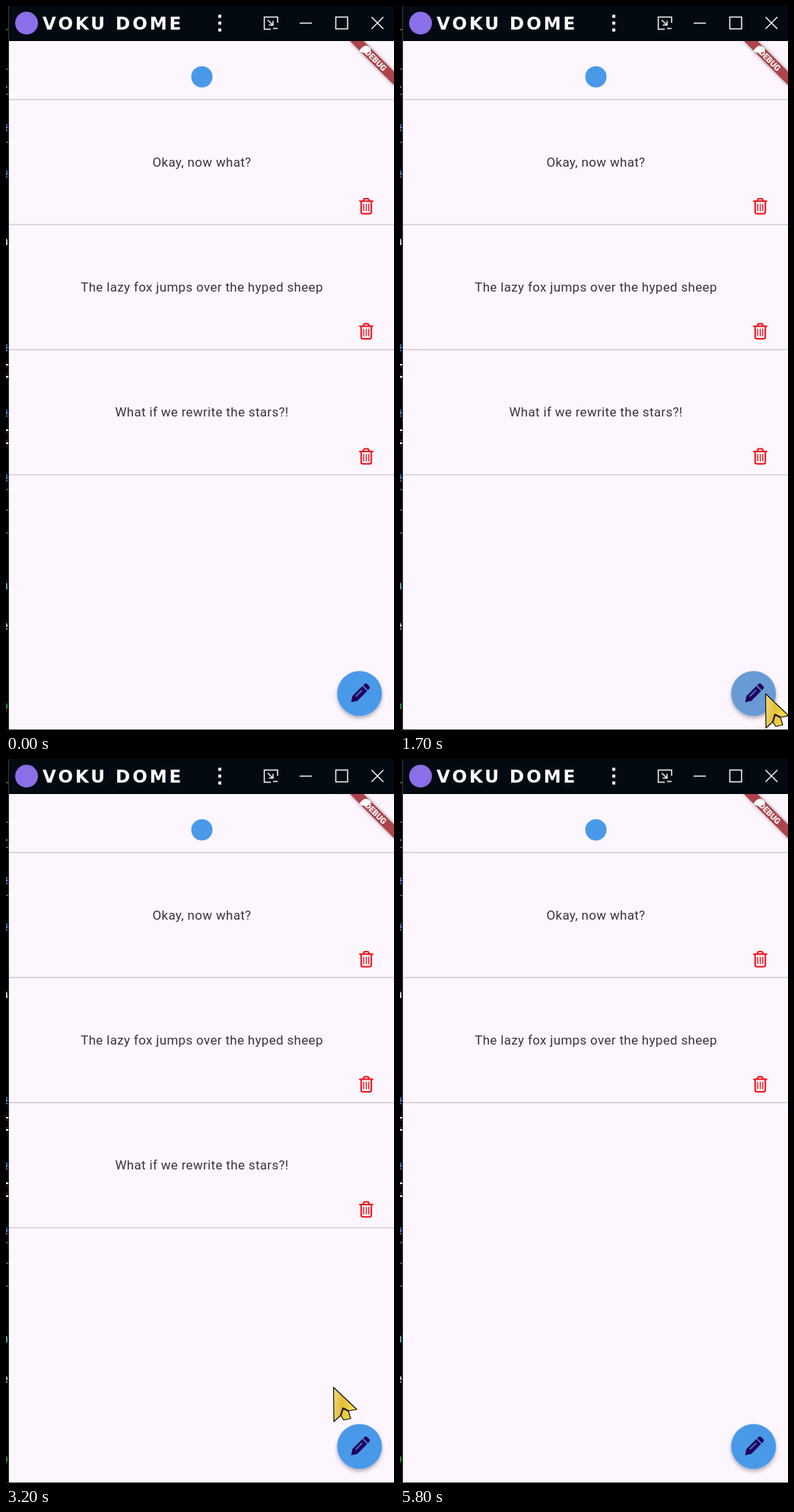
Animation, 510 px wide and 952 px high, one loop 5.9 s. Source, as an HTML page:

```html
<!DOCTYPE html>
<html lang="en">
<head>
<meta charset="utf-8">
<title>Notes app</title>
<style>
  html, body { margin: 0; width: 100%; height: 100%; overflow: hidden; background: #000; }
  svg { display: block; width: 510px; height: 952px; font-family: Roboto, sans-serif; }
  .item { font-size: 16.9px; letter-spacing: .37px; fill: #38333d; text-anchor: middle; }
  .button { font-size: 23.2px; letter-spacing: .1px; fill: #17161b; text-anchor: middle; }
  .hint { font-size: 19px; letter-spacing: .43px; fill: #727983; }
  .brand { font: bold 23px "DejaVu Sans", sans-serif; letter-spacing: 3px; fill: #fff; }
  .code { font: 16px "DejaVu Sans Mono", monospace; }
  .rule { stroke: #d3cad7; stroke-width: 1.5; }
</style>
</head>
<body>
<svg viewBox="0 0 510 952">
  <defs>
    <clipPath id="screen"><rect x="4" y="46" width="506" height="904"/></clipPath>
    <clipPath id="strip"><rect width="3" height="952"/></clipPath>
    <filter id="fabShadow" x="-30%" y="-30%" width="160%" height="170%">
      <feDropShadow dx="0" dy="3" stdDeviation="2.5" flood-opacity=".3"/>
    </filter>
    <filter id="buttonShadow" x="-2%" y="-10%" width="104%" height="130%">
      <feDropShadow dx="0" dy="1" stdDeviation=".7" flood-opacity=".25"/>
    </filter>
    <filter id="bannerShadow" x="-20%" y="-20%" width="140%" height="140%">
      <feDropShadow dx="0" dy="0" stdDeviation="2.5" flood-opacity=".4"/>
    </filter>
    <linearGradient id="gold" x2="1" y2=".25">
      <stop offset="0" stop-color="#f3df83"/>
      <stop offset=".45" stop-color="#e3bd3f"/>
      <stop offset="1" stop-color="#fbe04e"/>
    </linearGradient>
    <g id="header">
      <rect x="4" y="46" width="506" height="904" fill="#fef6ff"/>
      <circle cx="257.5" cy="93" r="14" fill="#4a99e9"/>
      <path class="rule" d="M4 122.7H510"/>
    </g>
    <g id="trash" fill="none" stroke="#f0141c" stroke-width="2" stroke-linecap="round" stroke-linejoin="round">
      <path d="M465 256.3H482M469.3 256L471 253H476L477.7 256M466.8 257V270.2Q466.8 272.7 469.3 272.7H477.7Q480.2 272.7 480.2 270.2V257"/>
      <path stroke-width="1.4" d="M470.2 260.2V268.8M473.5 260.2V268.8M476.8 260.2V268.8"/>
    </g>
  </defs>

  <rect width="510" height="952"/>
  <g id="editor" class="code" clip-path="url(#strip)"></g>
  <path d="M3.5 0V952" stroke="#4a4a50" stroke-width=".8"/>

  <g clip-path="url(#screen)">
    <rect x="4" y="46" width="506" height="904" fill="#fef6ff"/>
    <g id="listPage">
      <use href="#header"/>
      <g id="items"></g>
      <circle id="fab" cx="464.7" cy="902.7" r="29.5" filter="url(#fabShadow)"/>
      <g fill="#21005d" transform="translate(465.3 902.5) rotate(45)">
        <path d="M-4.5 -8.8H4.5V9.5L0 16.5L-4.5 9.5Z"/>
        <path d="M-4.5 -10.3V-12.5Q-4.5 -15.2 -1.8 -15.2H1.8Q4.5 -15.2 4.5 -12.5V-10.3Z"/>
        <path d="M-1 -5V7" stroke="#4a99e9" stroke-width="1.2"/>
      </g>
    </g>
    <g id="formPage">
      <use href="#header"/>
      <path d="M41.5 92.5H26M33.5 84.8L25.8 92.5L33.5 100.2" fill="none" stroke="#29262d" stroke-width="2"/>
      <rect x="48" y="702.5" width="419" height="51" fill="#e4eaf0"/>
      <text class="hint" x="61" y="734">What is happening?</text>
      <rect x="11.5" y="792" width="492" height="42.5" rx="21.2" fill="#e4eaf0" filter="url(#buttonShadow)"/>
      <text class="button" x="257.5" y="821">Add</text>
      <rect id="cancel" x="11.5" y="858.5" width="492" height="42.5" rx="21.2" filter="url(#buttonShadow)"/>
      <text class="button" x="257.5" y="887.3">Cancel</text>
    </g>
    <path d="M452 46H470L511 87V105Z" fill="#ac444b" filter="url(#bannerShadow)"/>
    <path d="M464.5 59.5Q467 53 473.5 52Q479 53.5 480 57.5Q475 65 464.5 59.5Z" fill="#fff"/>
    <text transform="translate(486.3 71.2) rotate(45)" y="3.9" text-anchor="middle" font-size="10.8" font-weight="900" fill="#fff">DEBUG</text>
  </g>

  <rect x="4" width="506" height="46" fill="#040a12"/>
  <circle cx="27" cy="22.5" r="15" fill="#8b6fe8"/>
  <text class="brand" x="48" y="30.7">VOKU DOME</text>
  <g fill="none" stroke="#f4f4f4" stroke-width="1.5">
    <path stroke-width="4" d="M281 11.5v4M281 20.5v4M281 29.5v4"/>
    <path d="M357 22V14.5H339.5V30.5H348M344 18.5L351 25M351 19.5V25H345.5M351 29.5H357"/>
    <path d="M386 22.5H402M433.5 14.5H449V30H433.5ZM480.5 14.5L496 30M496 14.5L480.5 30"/>
  </g>
  <rect y="950" width="510" height="2" fill="#0a181b"/>

  <g id="cursor" stroke="#111" stroke-width="1.2" stroke-linejoin="round">
    <path d="M0.5 0L31 29L20 31L23 41L14 43L10 37L1 45Z" fill="url(#gold)"/>
    <path d="M10 37L13 27.5L20 31" fill="none" stroke-width="2"/>
  </g>
</svg>

<script>
const LOOP = 5900, STEP = 100;
const PUSH = 1760, POP = 2865, ZOOM = 300;
const ROW = 164.3;
const el = id => document.getElementById(id);
const clamp = v => Math.max(0, Math.min(1, v));
const mix = (a, b, k) => a + (b - a) * k;

el("items").innerHTML = ["Okay, now what?", "The lazy fox jumps over the hyped sheep", "What if we rewrite the stars?!"]
  .map((text, i) => `<g transform="translate(0 ${i * ROW})">
    <text class="item" x="257.5" y="210.7">${text}</text>
    <use href="#trash"/><path class="rule" d="M4 287H510"/></g>`).join("");

// Slivers of the code window behind the phone: [glyph, colour, centre y...]
el("editor").innerHTML = [
  ["#", "#5b8ff0", 161, 222, 450, 536, 621], ["l", "#ddd", 101], ["a", "#eee", 308],
  ["I", "#c22", 479, 565], ["h", "#6fd3e8", 760], ["e", "#eee", 813], ["o", "#2fae2f", 918]
].map(([glyph, colour, ...rows]) => rows.map(y =>
  `<text x="-6.5" y="${y + 5.5}" fill="${colour}">${glyph}</text>`).join("")).join("") +
  [31, 83, 116, 179, 635, 662, 692].map(y => `<path d="M0 ${y}H3" stroke="#999"/>`).join("") +
  [471, 487, 557, 574].map(y => `<path d="M0 ${y}H3" stroke="#fff" stroke-width="2"/>`).join("");

// Emphasised easing: two cubic Béziers joined at (1/6, 0.4)
function emphasised(x) {
  if (x <= 0 || x >= 1) return clamp(x);
  const [px, py] = x < 1 / 6
    ? [[0, .05, .1333, 1 / 6], [0, 0, .06, .4]]
    : [[1 / 6, .2083, .25, 1], [.4, .82, 1, 1]];
  const bezier = (p, s) => {
    const r = 1 - s;
    return r * r * r * p[0] + 3 * r * r * s * p[1] + 3 * r * s * s * p[2] + s * s * s * p[3];
  };
  let low = 0, high = 1;
  for (let i = 0; i < 24; i++) {
    const mid = (low + high) / 2;
    if (bezier(px, mid) < x) low = mid; else high = mid;
  }
  return bezier(py, low);
}

const cursorPath = [
  [650, 514, 930], [1000, 480, 903], [2250, 480, 903], [2800, 441, 878], [2950, 441, 878],
  [3200, 430, 825], [3600, 447, 710], [3850, 465, 620], [4000, 468, 600], [4800, 468, 600]
];

function cursorAt(t) {
  const i = cursorPath.findIndex(p => p[0] > t);
  if (i < 1) return null;
  const [t0, x0, y0] = cursorPath[i - 1], [t1, x1, y1] = cursorPath[i];
  const k = (t - t0) / (t1 - t0);
  return [mix(x0, x1, k), mix(y0, y1, k)];
}

function placePage(id, scale, opacity) {
  el(id).setAttribute("transform", `translate(257 498) scale(${scale}) translate(-257 -498)`);
  el(id).setAttribute("opacity", opacity);
}

function draw(t) {
  const push = clamp((t - PUSH) / ZOOM), pop = clamp((t - POP) / ZOOM);
  const pushed = emphasised(push), popped = emphasised(pop);
  if (t < POP) {
    placePage("listPage", mix(1, 1.05, pushed), 1);
    placePage("formPage", mix(.85, 1, pushed), clamp((push - .1) / .125));
  } else {
    placePage("listPage", mix(1.1, 1, popped), 1);
    placePage("formPage", mix(1, .9, popped), 1 - clamp((pop - .117) / .125));
  }
  el("fab").setAttribute("fill", t >= 1300 && t < 2200 ? "#689bd5" : "#4a99e9");
  el("cancel").setAttribute("fill", t >= 2700 ? "#cfcfe2" : "#e4eaf0");
  el("items").lastElementChild.style.display = t < 4150 ? "" : "none";

  const tip = cursorAt(t);
  el("cursor").style.display = tip ? "" : "none";
  if (tip) el("cursor").setAttribute("transform", `translate(${tip})`);
}

function frame() {
  draw(Math.floor(performance.now() % LOOP / STEP) * STEP);
  requestAnimationFrame(frame);
}
frame();
</script>
</body>
</html>
```
